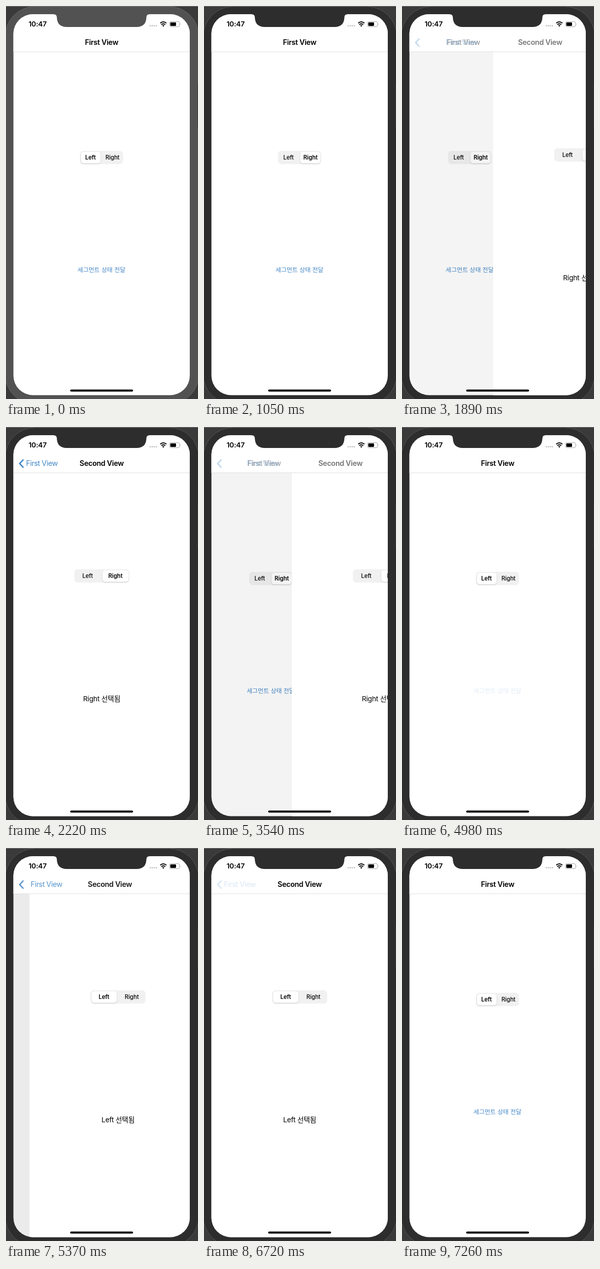
Write an HTML page that moves like this. It is 374 by 768 pixels and loops after 7740 ms.

```html
<!DOCTYPE html>
<html lang="ko">
<head>
<meta charset="utf-8">
<title>Segment navigation</title>
<style>
  html, body { margin: 0; width: 100%; height: 100%; overflow: hidden; background: #3a3a3a; }
  svg { display: block; }
  text { font-family: Inter, "Noto Sans CJK KR", "Noto Sans CJK", sans-serif; fill: #000; }
  .mid { text-anchor: middle; }
  .title { font-size: 14.2px; font-weight: 600; letter-spacing: -.33px; }
  .back { font-size: 14.2px; letter-spacing: -.45px; fill: #4387c7; }
  .clock { font-size: 13.6px; font-weight: 600; letter-spacing: -.15px; }
  .link { font: 11.8px "Noto Sans CJK KR", "Noto Sans CJK", sans-serif; fill: #4387c7; }
  .note { font-size: 13.6px; letter-spacing: -.2px; }
  .seg { font-size: 11.2px; font-weight: 500; letter-spacing: -.05px; }
  .bold { font-weight: 600; }
  .thumb { fill: #fff; filter: drop-shadow(0 1px 1.2px rgba(0, 0, 0, .18)); }
</style>
</head>
<body>
<svg width="374" height="768" viewBox="0 0 374 768">
  <defs>
    <clipPath id="screen"><rect x="14.5" y="16" width="343.5" height="744.5" rx="38"/></clipPath>
  </defs>
  <rect width="374" height="768" fill="#3a3a3a"/>
  <rect id="body" x="-1.5" y="1" width="377" height="777" rx="58"/>
  <rect width="374" height="1" fill="#777"/>
  <rect x="373" y="152" width="1" height="85" fill="#3a3a3a"/>
  <g clip-path="url(#screen)">
    <rect x="14" y="16" width="345" height="745" fill="#fff"/>
    <g id="first">
      <g id="seg1"></g>
      <text id="link" class="link mid" x="186" y="520.4">세그먼트 상태 전달</text>
    </g>
    <rect id="dim" x="14" y="90" width="345" height="671"/>
    <g id="second">
      <rect x="14" y="90" width="345" height="671" fill="#fff"/>
      <g id="seg2"></g>
      <text id="note" class="note mid" x="186.5" y="536"></text>
    </g>
    <rect x="14" y="16" width="345" height="74" fill="#fff"/>
    <rect x="14" y="89" width="345" height="1" fill="#e0e0e0"/>
    <text id="title1" class="title mid" y="76.4">First View</text>
    <text id="title2" class="title mid" y="76.4">Second View</text>
    <text id="back" class="back" y="76.4">First View</text>
    <path id="arrow" d="M34 63.7L26.6 71.5L34 79.3" fill="none" stroke="#4387c7" stroke-width="2.6"/>
    <text class="clock" x="44" y="40">10:47</text>
    <g fill="#c6c6c8" id="dots"></g>
    <g fill="none" stroke="#000" stroke-width="2">
      <path d="M300.4 33.6Q306.4 28.4 312.4 33.6"/>
      <path d="M302.6 36.4Q306.4 33 310.2 36.4"/>
    </g>
    <path d="M304.3 38.2Q306.4 36.4 308.5 38.2L306.4 40.4Z"/>
    <rect x="318.5" y="30.5" width="19.5" height="10" rx="2.8" fill="none" stroke="#a4a4a6"/>
    <rect x="320" y="32" width="11.2" height="7" rx="1.4"/>
    <path d="M339.2 33.9Q341 35.5 339.2 37.1Z" fill="#a4a4a6"/>
    <rect x="125" y="749.5" width="122.5" height="4" rx="2"/>
  </g>
  <path id="notch" d="M92 15H280V16Q273.5 16 273.5 22Q273 41 254 41H118.5Q99.5 41 99 22Q99 16 92 16Z"/>
</svg>
<script>
const LOOP = 7740, STEP = 30, WIDTH = 344;
const $ = id => document.getElementById(id);
const set = (el, attrs) => { for (const k in attrs) el.setAttribute(k, attrs[k]); };

function add(parent, name, attrs, text = '') {
  const el = document.createElementNS('http://www.w3.org/2000/svg', name);
  set(el, attrs);
  el.textContent = text;
  return parent.appendChild(el);
}

// Critically damped spring that lands exactly at the end of its run.
const spring = x => 1 - (1 + x) * Math.exp(-x);
function ease(t, start, end, rate) {
  if (t <= start) return 0;
  if (t >= end) return 1;
  return spring((t - start) * rate / 1000) / spring((end - start) * rate / 1000);
}
const mix = (a, b, p) => a + (b - a) * p;
const within = (t, a, b) => t >= a && t < b;

// Thumbs and centers are listed as [left, right].
function makeSegment(parent, x, y, width, thumbs, centers) {
  add(parent, 'rect', { x, y, width, height: 26, rx: 6.5, fill: '#f1f1f2' });
  const thumb = add(parent, 'rect', { class: 'thumb', y: y + 2, height: 22.5, rx: 5.5 });
  const labels = ['Left', 'Right'].map((word, i) => ['seg mid', 'seg mid bold'].map(cls =>
    add(parent, 'text', { class: cls, x: centers[i], y: y + 17.4 }, word)));
  return (p, dimmed = -1) => {
    set(thumb, {
      x: mix(thumbs[0][0], thumbs[1][0], p),
      width: mix(thumbs[0][1], thumbs[1][1], p)
    });
    labels.forEach(([plain, bold], i) => {
      const on = i ? p : 1 - p;
      set(plain, { opacity: (1 - on) * (i === dimmed ? .4 : 1) });
      set(bold, { opacity: on });
    });
  };
}

const drawSeg1 = makeSegment($('seg1'), 144, 283, 84, [[146, 38.3], [187.5, 39.5]], [164.6, 207.5]);
const drawSeg2 = makeSegment($('seg2'), 133, 278, 107, [[134.5, 49.5], [188, 51]], [159, 213.2]);
for (let i = 0; i < 4; i++) add($('dots'), 'circle', { cx: 281 + i * 4, cy: 38.6, r: 1.5 });

// Each move: start, end, rate of the spring, direction.
const pages = [
  [1770, 2220, 14.5, 1],
  [3430, 3900, 13.9, -1],
  [5090, 5610, 14, 1],
  [6790, 7260, 13.9, -1]
];
const slides = [
  [835, 1050, 24, 1],
  [4250, 4620, 16, -1]
];
const total = (moves, t) => Math.max(0, Math.min(1,
  moves.reduce((sum, [a, b, rate, dir]) => sum + dir * ease(t, a, b, rate), 0)));

function draw(t) {
  const q = total(pages, t), chosen = total(slides, t);
  const active = t >= 660;
  const linkDown = within(t, 1620, 1770) || within(t, 4980, 5070);
  const backDown = within(t, 3360, 3420) || within(t, 6720, 6780);
  const right = t < 4500;

  set($('body'), { fill: active ? '#2d2d2d' : '#525252', stroke: active ? '#545454' : '#666' });
  set($('notch'), { fill: active ? '#2d2d2d' : '#525252' });

  drawSeg1(chosen, within(t, 810, 840) ? 1 : within(t, 4200, 4260) ? 0 : -1);
  drawSeg2(right ? 1 : 0);
  $('note').textContent = (right ? 'Right' : 'Left') + ' 선택됨';

  set($('link'), { opacity: linkDown ? .16 : 1 });
  set($('first'), { transform: `translate(${-.3 * WIDTH * q})` });
  set($('dim'), { opacity: .085 * q });
  set($('second'), {
    transform: `translate(${WIDTH * (1 - q)})`,
    visibility: q > 0 ? 'visible' : 'hidden'
  });

  const press = backDown ? .2 : 1;
  set($('title1'), { x: 186.3 - 127 * q, opacity: Math.max(0, 1 - 1.25 * q) });
  set($('title2'), { x: 186.3 + 174 * (1 - q), opacity: q });
  set($('back'), { x: 39 + 98 * (1 - q), opacity: q ** 1.3 * press });
  set($('arrow'), { opacity: q ** 1.8 * press });
}

const begin = performance.now();
function tick() {
  const t = (performance.now() - begin) % LOOP;
  draw(Math.floor(t / STEP) * STEP);
  requestAnimationFrame(tick);
}
draw(0);
requestAnimationFrame(tick);
</script>
</body>
</html>
```
